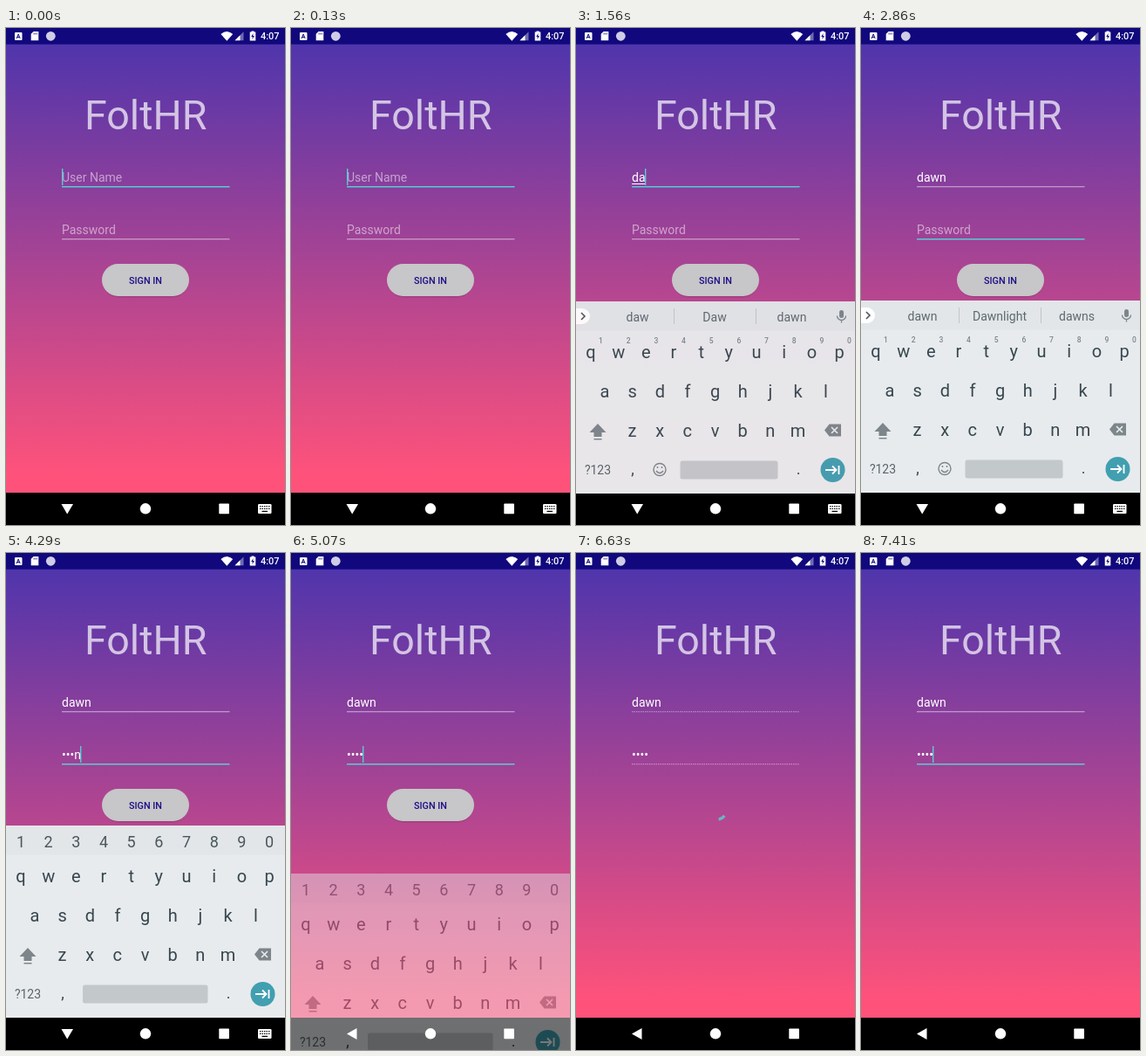
Write an HTML page that moves like this. It is 320 px wide and 569 px high and loops after 8000 ms.

```html
<!DOCTYPE html>
<html lang="en">
<head>
<meta charset="utf-8">
<title>Sign in</title>
<style>
  html, body { margin: 0; width: 100%; height: 100%; overflow: hidden; background: #000; }
  svg { display: block; width: 100vw; height: 100vh; }
  text { font-family: Roboto, "Open Sans", sans-serif; white-space: pre; }
</style>
</head>
<body>
<svg id="stage" viewBox="0 0 320 569">
  <defs>
    <linearGradient id="sky" gradientUnits="userSpaceOnUse" x1="0" y1="19" x2="0" y2="512">
      <stop offset="0" stop-color="#5035ac"/>
      <stop offset="1" stop-color="#ff527b"/>
    </linearGradient>
  </defs>
  <rect width="320" height="532" fill="url(#sky)"/>

  <g id="statusBar" fill="#fff">
    <rect width="320" height="18.7" fill="#10087c"/>
    <rect x="10" y="5" width="8.5" height="9" rx="1"/>
    <path d="M12.2 12L14.2 7L16.2 12M12.9 10.5H15.5" fill="none" stroke="#10087c"/>
    <path d="M31.5 4H37.3V14.3H28.7V6.8Z"/>
    <path d="M32 5.5V7.5M33.7 5.5V7.5M35.4 5.5V7.5" stroke="#10087c" stroke-width=".7"/>
    <circle cx="51.3" cy="9.3" r="5.4" fill="#cfcde6"/>
    <path d="M246.4 7Q253.3 1.2 260.2 7L253.3 14.8Z"/>
    <path d="M262.5 14.3L272.5 4.3V14.3Z" opacity=".4"/>
    <path d="M262.5 14.3L268.5 8.3V14.3Z"/>
    <path d="M281.5 3.5H284.5V4.5H286.3V14.5H279.7V4.5H281.5Z"/>
    <path d="M283.6 6L281.2 10H282.8L282.4 13L284.9 9H283.2Z" fill="#10087c"/>
    <text x="292" y="13.2" font-size="10.9" font-weight="500">4:07</text>
  </g>

  <text x="160.2" y="116" font-size="46.6" text-anchor="middle" fill="#fff" fill-opacity=".7">FoltHR</text>
  <g id="fields" font-size="14" fill="#fff"></g>

  <g id="button">
    <rect x="110.5" y="271.5" width="99" height="37" rx="18.5" fill="#000" opacity=".12"/>
    <rect x="110" y="270" width="100" height="37" rx="18.5" fill="#c7c6c8"/>
    <text x="160" y="293" font-size="10.8" font-weight="500" text-anchor="middle" fill="#1b0d86">SIGN IN</text>
  </g>
  <path id="spinner" fill="none" stroke="#68b4c4" stroke-width="3.4"/>

  <rect y="532" width="320" height="37"/>
  <g id="keyboard"></g>

  <g id="navBar" fill="#fff">
    <path id="back"/>
    <circle cx="160" cy="550.3" r="6.2"/>
    <rect x="244.3" y="544.5" width="11.7" height="11.7" rx=".8"/>
    <g id="imeIcon">
      <rect x="289" y="545" width="15.5" height="11" rx="1.3"/>
      <path d="M291 547.7H303M291 550.3H303" stroke="#000" stroke-width="1.3" stroke-dasharray="1.4 1.1"/>
      <path d="M293.5 553.4H300" stroke="#000" stroke-width="1.3"/>
    </g>
  </g>
</svg>
<script>
const $ = id => document.getElementById(id);
const NS = "http://www.w3.org/2000/svg";
const LOOP = 8000;
const TEAL = "#56ccd2";

function add(parent, tag, attrs = {}, text) {
  const node = document.createElementNS(NS, tag);
  for (const key in attrs) node.setAttribute(key, attrs[key]);
  if (text !== undefined) node.textContent = text;
  parent.append(node);
  return node;
}
const set = (node, attrs) => {
  for (const key in attrs) node.setAttribute(key, attrs[key]);
};
const show = (node, on) => node.setAttribute("visibility", on ? "visible" : "hidden");

function makeField(hintText, baseline) {
  const root = $("fields");
  const hint = add(root, "text", { x: 64, y: baseline, "fill-opacity": .52 }, hintText);
  const value = add(root, "text", { x: 64, y: baseline });
  const composing = add(root, "rect", { x: 64, y: baseline + 2, height: 1 });
  const lineY = baseline + 5.7;
  const line = add(root, "line", { x1: 64, x2: 256.5, y1: lineY, y2: lineY });
  const caret = add(root, "rect", { y: baseline - 15, width: 1.4, height: 19, fill: TEAL });
  return ({ text, focused, caretOn, underlined, disabled }) => {
    value.textContent = text;
    const width = text ? value.getComputedTextLength() : 0;
    show(hint, !text);
    show(composing, underlined);
    composing.setAttribute("width", width);
    show(caret, focused && caretOn);
    caret.setAttribute("x", Math.floor(64 + width));
    set(line, {
      stroke: focused ? TEAL : "#fff",
      "stroke-opacity": focused ? 1 : disabled ? .5 : .6,
      "stroke-width": focused ? 1.6 : 1.1,
      "stroke-dasharray": disabled ? "1.5 1" : "none"
    });
  };
}

function makeKeyboard() {
  const root = $("keyboard");
  const label = (parent, text, x, y, size, fill = "#37474f", weight = 400) =>
    add(parent, "text", { x, y, fill, "font-size": size, "font-weight": weight, "text-anchor": "middle" }, text);
  const row = (parent, chars, x, y, size, fill, weight) =>
    [...chars].forEach((c, i) => label(parent, c, x + i * 31.67, y, size, fill, weight));
  const grey = "#7c868b";

  add(root, "rect", { y: 312, width: 320, height: 257, fill: "#e8ebed" });
  add(root, "rect", { y: 312, width: 320, height: 33.5, fill: "#e2e6e8" });
  add(root, "rect", { id: "kbFoot", y: 532, width: 320, height: 37, fill: "#000" });
  row(root, "qwertyuiop", 17, 377, 20);
  row(root, "asdfghjkl", 33, 422, 20);
  row(root, "zxcvbnm", 64.5, 467, 20);
  label(root, "?123", 25, 510, 14, "#57646a");
  label(root, ",", 65, 510, 18);
  label(root, ".", 255, 510, 18);
  const space = add(root, "rect", { y: 494.5, height: 21, rx: 2.5, fill: "#c3c8cb" });

  add(root, "path", { d: "M25 452L34.5 462H29.5V467H20.5V462H15.5ZM20.5 469H29.5V470.5H20.5Z", fill: grey });
  add(root, "path", { d: "M290.5 452.5H304V466.5H290.5L285 459.5Z", fill: grey });
  add(root, "path", { d: "M293 456L300 463M300 456L293 463", stroke: "#e8ebed", "stroke-width": 1.7 });
  add(root, "circle", { cx: 294.5, cy: 505, r: 14, fill: "#419fb0" });
  add(root, "path", { d: "M286 505H298M294 500.5L298.5 505L294 509.5M301.5 500V510", fill: "none", stroke: "#fff", "stroke-width": 1.8 });

  const words = add(root, "g");
  row(words, "1234567890", 28.5, 360, 8.5, grey, 500);
  add(words, "path", { d: "M0 320H7A9 9 0 0 1 7 338H0Z", fill: "#fff" });
  add(words, "path", { d: "M6 325L10 329L6 333", fill: "none", stroke: "#4d585d", "stroke-width": 1.6 });
  add(words, "path", { d: "M112.5 320V338M206.5 320V338", stroke: "#bfc6c9" });
  const tips = [70.5, 159, 247.5].map(x => label(words, "", x, 334.5, 14, "#5d696f"));
  add(words, "rect", { x: 302, y: 322, width: 5, height: 9, rx: 2.5, fill: grey });
  add(words, "path", { d: "M299.5 328.5A5 5 0 0 0 309.5 328.5M304.5 333.5V336.5", fill: "none", stroke: grey, "stroke-width": 1.3 });
  const smile = { fill: "none", stroke: grey, "stroke-width": 1.4 };
  add(words, "circle", { cx: 96, cy: 504.5, r: 7, ...smile });
  add(words, "path", { d: "M92 506Q96 511 100 506M93.5 501V503M98.5 501V503", ...smile });

  const digits = add(root, "g");
  row(digits, "1234567890", 17, 336.5, 18, "#4a575d");

  return ({ kbShift, kbAlpha, numeric, suggestions }) => {
    root.style.display = kbAlpha ? "" : "none";
    set(root, { opacity: kbAlpha, transform: `translate(0 ${kbShift})` });
    // While sliding, the panel extends over the navigation bar.
    $("kbFoot").style.display = kbShift > 5 ? "none" : "";
    words.style.display = numeric ? "none" : "";
    digits.style.display = numeric ? "" : "none";
    set(space, numeric ? { x: 88, width: 143.5 } : { x: 119.5, width: 112 });
    suggestions.forEach((word, i) => tips[i].textContent = word);
  };
}

const drawUser = makeField("User Name", 176);
const drawPassword = makeField("Password", 236);
const drawKeyboard = makeKeyboard();

// Each entry changes part of the screen from its time onwards.
const timeline = [
  [0, { user: "", pass: "", focus: "user", caret: true, composing: false, kbAlpha: 0, kbShift: 0,
        numeric: false, suggestions: ["", "", ""], imeUp: true, button: true, busy: false }],
  [1040, { user: "da", composing: true, kbAlpha: .47, kbShift: 55, suggestions: ["d", "do", "don't"] }],
  [1560, { kbAlpha: .97, kbShift: 1, suggestions: ["daw", "Daw", "dawn"] }],
  [1820, { user: "daw", kbAlpha: 1, kbShift: 0 }],
  [2080, { user: "dawn" }],
  [2210, { suggestions: ["dawn", "Dawnlight", "dawns"] }],
  [2470, { focus: "pass", composing: false }],
  [2860, { caret: false }],
  [3120, { caret: true, numeric: true }],
  [3380, { pass: "d" }],
  [3640, { pass: "•a" }],
  [4030, { pass: "••w" }],
  [4290, { pass: "•••n" }],
  [4550, { pass: "••••" }],
  [4810, { imeUp: false }],
  [5070, { kbAlpha: .47, kbShift: 55 }],
  [5330, { kbAlpha: 0, focus: "", button: false, busy: true }],
  [7410, { focus: "pass", busy: false }]
];
const spinnerTicks = [5330, 6110, 6630, 6760, 7020, 7150];

const ease = x => {
  const u = Math.min(1, Math.max(0, x));
  return u * u * (3 - 2 * u);
};

function spinnerPath(t) {
  const tick = spinnerTicks.filter(s => s <= t).pop() || spinnerTicks[0];
  const age = tick - spinnerTicks[0];
  const phase = age % 1333 / 1333;
  const turn = 12 + age / 4444 * 720;
  const from = turn + 270 * ease(phase * 2 - 1);
  const to = turn + 32 + 270 * ease(phase * 2);
  const point = deg => {
    const a = deg * Math.PI / 180;
    return `${160 + 13.7 * Math.sin(a)} ${292 - 13.7 * Math.cos(a)}`;
  };
  return `M${point(from)}A13.7 13.7 0 ${to - from > 180 ? 1 : 0} 1 ${point(to)}`;
}

function render(t) {
  const s = Object.assign({}, ...timeline.filter(([at]) => at <= t).map(entry => entry[1]));
  drawUser({ text: s.user, focused: s.focus === "user", caretOn: s.caret, underlined: s.composing, disabled: s.busy });
  drawPassword({ text: s.pass, focused: s.focus === "pass", caretOn: s.caret, underlined: false, disabled: s.busy });
  drawKeyboard(s);
  show($("button"), s.button);
  show($("spinner"), s.busy);
  if (s.busy) $("spinner").setAttribute("d", spinnerPath(t));
  show($("imeIcon"), s.imeUp);
  $("back").setAttribute("d", s.imeUp ? "M63.5 545H77L70.2 556.5Z" : "M64 550.5L75.5 544V557Z");
}

const start = performance.now();
function loop() {
  render((performance.now() - start) % LOOP);
  requestAnimationFrame(loop);
}
loop();
</script>
</body>
</html>
```
